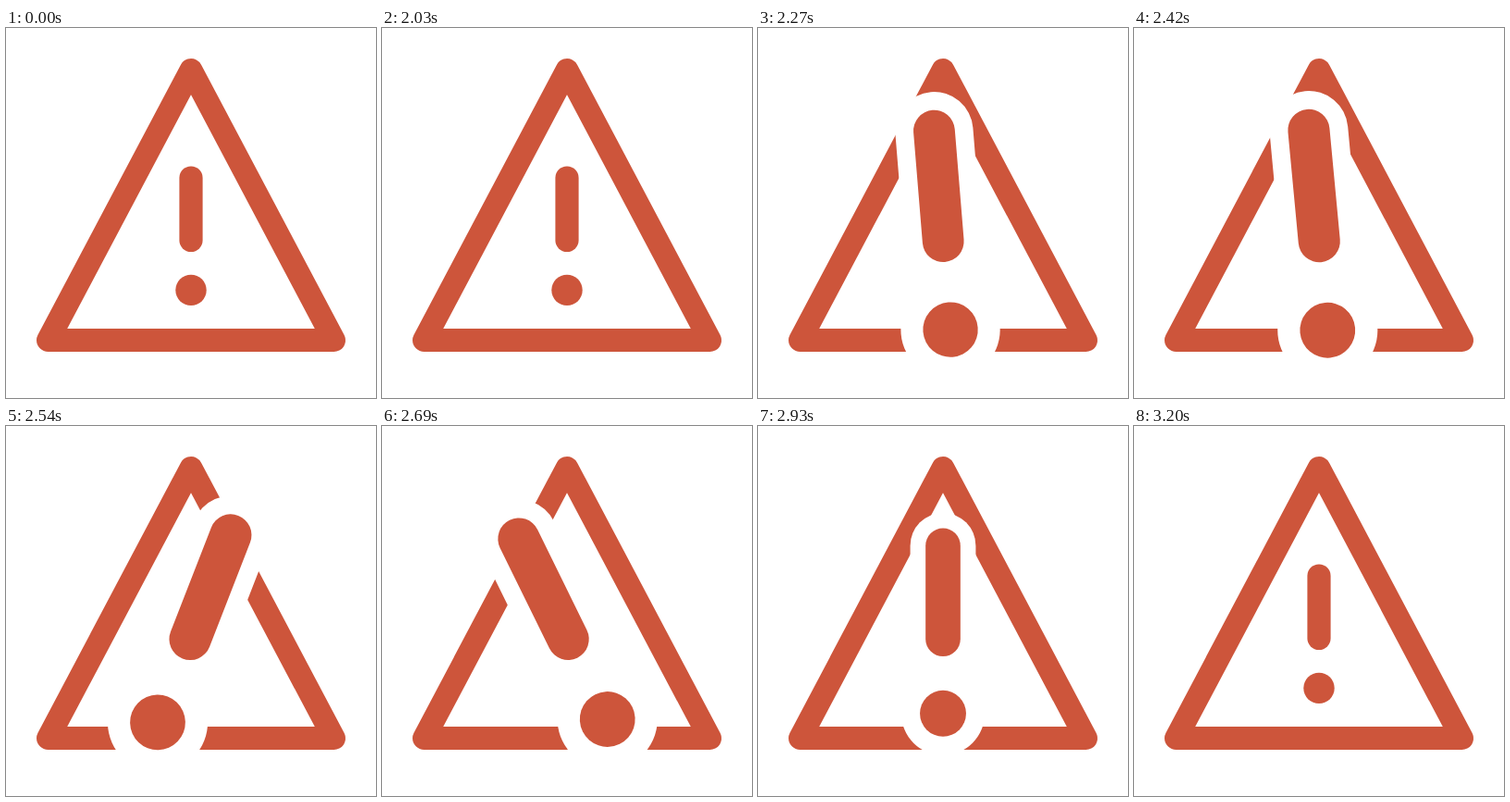
An HTML page that plays this animation: 400x400 px, repeating every 3.23 s.

```html
<!DOCTYPE html>
<html lang="en">
<head>
<meta charset="utf-8">
<title>Warning</title>
<style>
  html, body { margin: 0; width: 100%; height: 100%; overflow: hidden; background: #fff; }
  svg { display: block; width: 100%; height: 100%; }
  path { fill: none; stroke: #cd553b; stroke-linecap: round; stroke-linejoin: round; }
  circle { fill: #cd553b; }
  .halo path { stroke: #fff; }
  .halo circle { fill: #fff; }
</style>
</head>
<body>
<svg viewBox="0 0 400 400">
  <path d="M200 45.5 L354.5 337.5 H45.5 Z" stroke-width="25"/>
  <!-- the mark is drawn around its pivot -->
  <g id="mark">
    <g class="halo">
      <path d="M0 -66 V1.5" stroke-width="47.4"/>
      <circle cy="55.4" r="30.2"/>
    </g>
    <path d="M0 -66 V1.5" stroke-width="25.2"/>
    <circle cy="55.4" r="16.7"/>
  </g>
</svg>
<script>
  const LOOP = 3230, STEP = 30;
  const mark = document.getElementById('mark');

  // [time in ms, value]
  const scaleKeys = [[2030, 1], [2290, 1.79], [2770, 1.79], [3155, 1]];
  const angleKeys = [[2242, 0], [2354, -30], [2504, 30], [2654, -30], [2815, 0]];

  const smooth = p => p * p * (3 - 2 * p);

  function valueAt(keys, t) {
    const next = keys.findIndex(([time]) => time > t);
    if (next === 0) return keys[0][1];
    if (next < 0) return keys[keys.length - 1][1];
    const [t0, v0] = keys[next - 1], [t1, v1] = keys[next];
    return v0 + (v1 - v0) * smooth((t - t0) / (t1 - t0));
  }

  function draw() {
    const now = performance.now() % LOOP;
    const t = now - (now + 10) % STEP;
    mark.setAttribute('transform',
      `translate(200 228) rotate(${valueAt(angleKeys, t)}) scale(${valueAt(scaleKeys, t)})`);
    requestAnimationFrame(draw);
  }
  draw();
</script>
</body>
</html>
```
